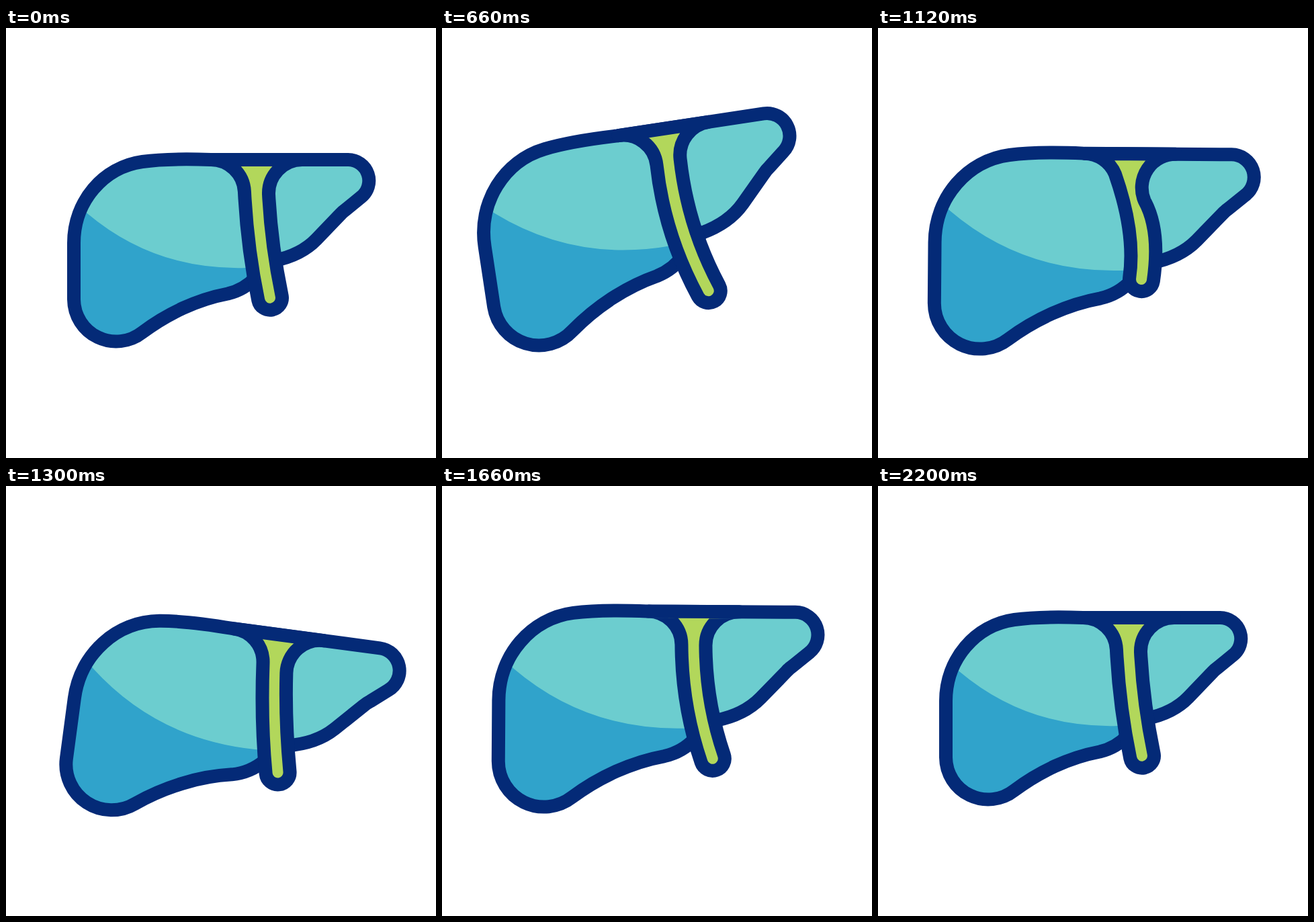
An HTML page for the animation above (2.4 s loop, 640 px wide and 640 px high).

```html
<!DOCTYPE html>
<html lang="en">
<head>
<meta charset="utf-8">
<title>Liver</title>
<style>
  html, body { margin: 0; width: 100%; height: 100%; overflow: hidden; background: #fff; }
  svg { display: block; width: 100%; height: 100%; }
</style>
</head>
<body>
<svg viewBox="0 0 640 640">
  <defs>
    <path id="shape" d="M305 196 C262 194.500 228 195.500 203 199 C145 207 101 258 101 320 V404
      A63 63 0 0 0 203 453 C240 425 285 404 330 395.500 C345 392 360 384 372 371 L400 346
      C430 340 448 329 462 314.500 L497 278 Q501 273.500 506 270 L528 252
      A31.200 31.200 0 0 0 509 196 Z"/>
    <clipPath id="inside"><use href="#shape"/></clipPath>
  </defs>
  <g id="liver" stroke-linejoin="round">
    <g id="body">
      <use href="#shape" fill="#6ccdcf"/>
      <path clip-path="url(#inside)" fill="#30a3cb" d="M90 247 L121 276 Q222 361 357 357 L420 355 V500 H80 Z"/>
      <use href="#shape" fill="none" stroke="#042a77"/>
    </g>
    <path id="duct" fill="#b2d75b" stroke="#042a77" stroke-width="20"/>
  </g>
</svg>
<script>
const LOOP = 2400, STEP = 20, LINE = 20;
const [liver, body, duct] = ['liver', 'body', 'duct'].map(id => document.getElementById(id));

// Eased 0 to 1 between two times
function ramp(t, from, to) {
  const p = Math.min(1, Math.max(0, (t - from) / (to - from)));
  return p * p * (3 - 2 * p);
}

function pose(t) {
  const rise = ramp(t, 200, 800), dip = ramp(t, 800, 1400);
  const back = ramp(t, 1400, 1800), settle = ramp(t, 1800, 2200);
  const snap = ramp(t, 800, 1100), release = ramp(t, 1100, 1400);
  return {
    angle: -10 * rise + 19 * dip - 12 * back + 3 * settle,
    scale: 1 + 0.08 * (ramp(t, 200, 700) - ramp(t, 1700, 2200)),
    length: 157 + 51 * rise - 70 * snap + 24 * release + 13 * back - 18 * settle,
    tilt: 7.3 + 1.6 * rise - 1.3 * snap + 2.3 * release - 2.6 * settle
  };
}

// Tube of constant width hanging from a funnel; the shorter it gets, the more it bows to the right
function ductPath(length, tilt) {
  const x = 373, y = 246, half = 18, r = 50, gap = half + r;
  const a = tilt * Math.PI / 180;
  const bow = 15 * Math.exp((157 - length) / 19) - 21;
  const ex = x + length * Math.sin(a), ey = y + length * Math.cos(a);
  const cx = (x + ex) / 2 + bow * Math.cos(a), cy = (y + ey) / 2 - bow * Math.sin(a);
  const lean = Math.atan2(cx - x, cy - y);
  const tip = Math.atan2(ex - cx, ey - cy);
  const mid = (lean + tip) / 2;
  const reach = half / Math.cos((tip - lean) / 2);
  const at = (px, py, angle, d) =>
    `${(px + d * Math.cos(angle)).toFixed(2)} ${(py - d * Math.sin(angle)).toFixed(2)}`;
  return `M${x - gap} ${y - r} A${r} ${r} 0 0 1 ${at(x - gap, y, lean, r)}
    Q${at(cx, cy, mid, -reach)} ${at(ex, ey, tip, -half)}
    A${half} ${half} 0 0 0 ${at(ex, ey, tip, half)}
    Q${at(cx, cy, mid, reach)} ${at(x + gap, y, lean, -r)}
    A${r} ${r} 0 0 1 ${x + gap} ${y - r} Z`;
}

function draw(t) {
  const { angle, scale, length, tilt } = pose(t);
  liver.setAttribute('transform', `rotate(${angle} 117 456)`);
  body.setAttribute('transform', `translate(320 331.5) scale(${scale}) translate(-320 -331.5)`);
  body.setAttribute('stroke-width', LINE / scale);
  // The duct keeps its size and follows the top edge of the body
  duct.setAttribute('transform', `translate(0 ${135.5 * (1 - scale)})`);
  duct.setAttribute('d', ductPath(length, tilt));
}

const start = performance.now();
function tick() {
  const t = (performance.now() - start) % LOOP;
  draw(Math.floor(t / STEP) * STEP);
  requestAnimationFrame(tick);
}
draw(0);
requestAnimationFrame(tick);
</script>
</body>
</html>
```
